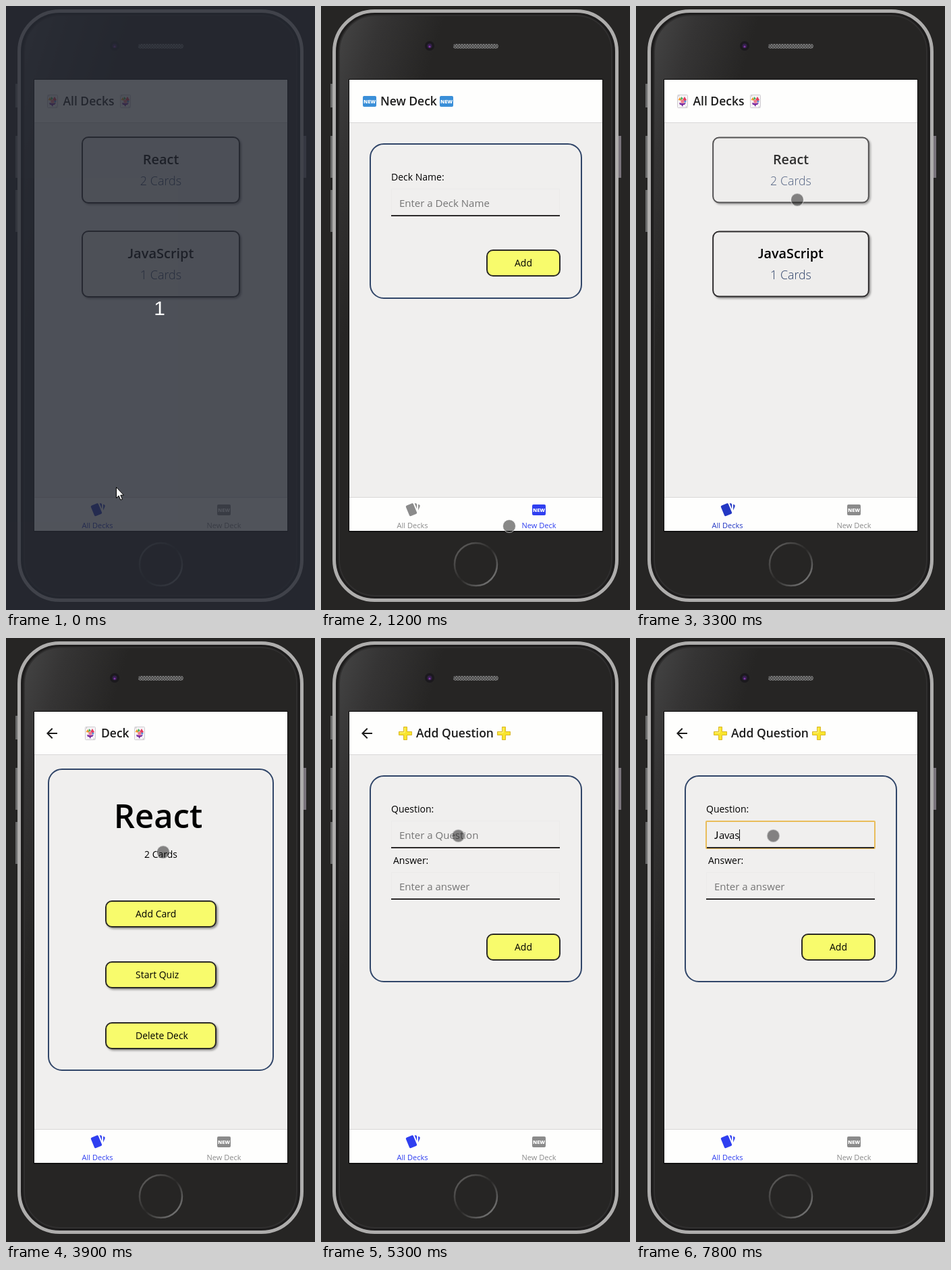
Animation of 458 by 893 pixels, one loop 8000 ms. Source, as an HTML page:

```html
<!DOCTYPE html>
<html lang="en">
<head>
<meta charset="utf-8">
<title>Flashcards</title>
<style>
  html, body { margin: 0; width: 100%; height: 100%; overflow: hidden; background: #262524; }
  svg { display: block; width: 458px; height: 893px; }
  text { font-family: "Open Sans", "Noto Sans", sans-serif; font-size: 14px; fill: #000; white-space: pre; }
  .j { font-family: Lato, sans-serif; }
  .mid { text-anchor: middle; }
  .title { font-size: 17.5px; font-weight: 600; fill: #1c1c1c; }
  .name { font-size: 20px; font-weight: 600; }
  .count { font-size: 18px; font-weight: 300; fill: #2d4168; }
  .hint { font-size: 15px; fill: #757575; }
  .typed { font-size: 15px; }
  .tab { font-size: 11px; text-anchor: middle; fill: inherit; }
  .card { fill: #eeedec; stroke: #2e2c2d; stroke-width: 2; }
  .btn { fill: #f8fb6c; stroke: #2b2a26; stroke-width: 2; }
  .frame { fill: none; stroke: #314669; stroke-width: 2; }
  .drop { filter: drop-shadow(2px 2px 1.5px rgba(0, 0, 0, .4)); }

  /* One loop is 8 s, so 1.25% is a tenth of a second. */
  .anim { animation: 8s step-end infinite; }
  #list { animation-name: list; }
  #create { animation-name: create; }
  #deck { animation-name: deck; }
  #add { animation-name: add; }
  #dim { animation-name: dim; }
  #pointer { animation-name: pointer; }
  #allTab { animation-name: all-tab; }
  #newTab { animation-name: new-tab; }
  .shrink { animation-name: shrink; transform-box: fill-box; transform-origin: center; }
  #press { animation-name: press; }
  #addCard { animation-name: add-card; }
  #focus { animation-name: focus; }
  #hint { animation-name: hint; }
  #caret { animation-name: caret; }
  #k1 { animation-name: k1; }
  #k2 { animation-name: k2; }
  #k3 { animation-name: k3; }
  #k4 { animation-name: k4; }

  @keyframes list { 0%, 27.5% { opacity: 1 } 15%, 42.5%, 100% { opacity: 0 } }
  @keyframes create { 0%, 27.5%, 100% { opacity: 0 } 15% { opacity: 1 } }
  @keyframes deck { 0%, 58.75%, 100% { opacity: 0 } 42.5% { opacity: 1 } }
  @keyframes add { 0% { opacity: 0 } 58.75%, 100% { opacity: 1 } }
  @keyframes dim { 0% { opacity: 1 } 5%, 100% { opacity: 0 } }
  @keyframes all-tab { 0%, 27.5% { fill: #2438c4 } 15% { fill: #8b8b8b } 42.5%, 100% { fill: #2f3ff0 } }
  @keyframes new-tab { 0%, 27.5%, 100% { fill: #8b8b8b } 15% { fill: #2f3ff0 } }
  @keyframes shrink { 0% { transform: none } 30% { transform: scale(.995) } 31.25%, 100% { transform: scale(.99) } }
  @keyframes press { 0%, 100% { opacity: 1 } 40% { opacity: .9 } 41.25% { opacity: .8 } }
  @keyframes add-card { 0%, 100% { opacity: 1 } 55% { opacity: .6 } 56.25% { opacity: .24 } }
  @keyframes focus { 0% { opacity: 0 } 75% { opacity: .5 } 76.25%, 100% { opacity: 1 } }
  @keyframes hint { 0% { opacity: 1 } 82.5%, 100% { opacity: 0 } }
  @keyframes k1 { 0% { opacity: 0 } 82.5%, 100% { opacity: 1 } }
  @keyframes k2 { 0% { opacity: 0 } 87.5%, 100% { opacity: 1 } }
  @keyframes k3 { 0% { opacity: 0 } 95%, 100% { opacity: 1 } }
  @keyframes k4 { 0% { opacity: 0 } 97.5%, 100% { opacity: 1 } }
  @keyframes caret {
    0% { opacity: 0; transform: none }
    75% { opacity: 1; transform: none }
    82.5% { opacity: 1; transform: translateX(7px) }
    87.5% { opacity: 1; transform: translateX(15px) }
    95% { opacity: 1; transform: translateX(23px) }
    97.5%, 100% { opacity: 1; transform: translateX(37px) }
  }
  @keyframes pointer {
    0% { opacity: 0; transform: translate(165px, 713px) }
    5% { opacity: 1; transform: translate(165px, 713px); animation-timing-function: steps(2) }
    7.5% { opacity: 1; transform: translate(264px, 760px) }
    11.25% { opacity: 1; transform: translate(279px, 769px) }
    17.5% { opacity: 1; transform: translate(279px, 769px); animation-timing-function: steps(2) }
    20% { opacity: 1; transform: translate(164px, 778px) }
    22.5% { opacity: 1; transform: translate(134px, 774px) }
    27.5% { opacity: 1; transform: translate(135.5px, 758.5px) }
    28.75% { opacity: 1; transform: translate(135.5px, 758.5px); animation-timing-function: steps(6) }
    36.25% { opacity: 1; transform: translate(239px, 286.5px) }
    47.5% { opacity: 1; transform: translate(239px, 286.5px); animation-timing-function: steps(4) }
    52.5% { opacity: 1; transform: translate(215px, 406.5px) }
    60% { opacity: 1; transform: translate(215px, 406.5px); animation-timing-function: steps(2) }
    62.5% { opacity: 1; transform: translate(206px, 294px) }
    66.25%, 100% { opacity: 1; transform: translate(203.5px, 292.5px) }
  }
</style>
</head>
<body>
<svg viewBox="0 0 458 893">
  <defs>
    <linearGradient id="sheen" x2=".45" y2=".3">
      <stop stop-color="#454545"/><stop offset=".25" stop-color="#353434"/><stop offset=".6" stop-color="#262524"/>
    </linearGradient>
    <linearGradient id="ring" x2="1" y2="1">
      <stop offset=".1" stop-color="#5c5b5a"/><stop offset=".5" stop-color="#2a2928"/><stop offset=".9" stop-color="#777"/>
    </linearGradient>
    <pattern id="mesh" width="4" height="4" patternUnits="userSpaceOnUse">
      <path fill="#484848" d="M0 0h4v4h-4z"/><path fill="#777" d="M0 0h2v2h-2zM2 2h2v2h-2z"/>
    </pattern>
    <g id="joker">
      <rect x=".5" y=".5" width="15" height="19" rx="1" fill="#f6f4f6" stroke="#cfcbd0"/>
      <path fill="#f39a2b" d="M7 9 1.500 8 4 4z"/>
      <path fill="#3fae5a" d="M5 8 6 3 9 6z"/>
      <path fill="#e53a5c" d="M8 8 11 3 14 8 11 10z"/>
      <path fill="#3d86d8" d="M10 8 14 10 11 12z"/>
      <circle cx="8" cy="10" r="2.700" fill="#ef7c8e"/>
      <path fill="#7a2ba0" d="M3 12 8 13 13 12 11 15 9 15 8 18 6 15 4 15z"/>
      <path stroke="#888" d="M2 2h1M13 18h1"/>
    </g>
    <g id="plus">
      <path d="M7.500 .5h5v7h7v5h-7v7h-5v-7h-7v-5h7z" fill="#f9e52d" stroke="#d9b72a" stroke-linejoin="round"/>
      <path d="M9 2v7H2" fill="none" stroke="#fff58c"/>
    </g>
    <g id="badge">
      <rect width="20" height="16" rx="2"/>
      <text x="10" y="11" class="mid" style="font-size:7.5px;font-weight:800;fill:#fff">NEW</text>
    </g>
    <path id="back" fill="#1c1c1c" d="M20 11H7.830l5.590-5.590L12 4l-8 8 8 8 1.410-1.410L7.830 13H20z"/>
    <g id="input">
      <path d="M.5 40V.5h249V40" fill="none" stroke="#ebeaea"/>
      <path d="M0 40h250" stroke="#2c2a2a" stroke-width="2"/>
    </g>
  </defs>

  <!-- phone -->
  <rect width="458" height="893" fill="#262524"/>
  <g fill="#6d6d6d">
    <path d="M14 115h4v35h-4zM14 192h4v62h-4zM14 272h4v62h-4z"/>
    <path fill="#79737b" d="M441 192h4v62h-4z"/>
  </g>
  <rect x="19.500" y="7.500" width="419" height="871" rx="60" fill="#1e1d1d" stroke="#aeadac" stroke-width="5"/>
  <rect x="27" y="14" width="404" height="858" rx="53" fill="url(#sheen)" stroke="#302f2f" stroke-width="2"/>
  <circle cx="161" cy="59" r="7" fill="#1b191d"/>
  <circle cx="161" cy="59" r="3.500" fill="#33204a"/>
  <circle cx="161" cy="60" r="1.500" fill="#8436a6"/>
  <rect x="196" y="56" width="67" height="7" rx="3.500" fill="url(#mesh)"/>
  <circle cx="229.500" cy="825.500" r="31.500" fill="none" stroke="url(#ring)" stroke-width="2.500"/>

  <!-- app shell -->
  <path fill="#090909" d="M41 108h377v669.500h-377z"/>
  <path fill="#f0efee" d="M42 109h375v667h-375z"/>
  <path fill="#fefefd" d="M42 109h375v63h-375zM42 727h375v49h-375z"/>
  <path stroke="#d9d8d8" d="M42 172.500h375M42 726.500h375"/>
  <g id="allTab" class="anim">
    <path fill="#2f3ff0" style="fill:inherit" transform="translate(124 733)" d="M21.470 4.350 20.130 3.790V12.820L22.560 6.960C22.970 5.940 22.500 4.770 21.470 4.350M1.970 8.050 6.930 20C7.240 20.770 7.970 21.240 8.740 21.260 9 21.260 9.270 21.210 9.530 21.100L16.900 18.050C17.650 17.740 18.110 17 18.130 16.260 18.140 16 18.090 15.710 18 15.450L13 3.500C12.710 2.730 11.970 2.260 11.190 2.250 10.930 2.250 10.670 2.310 10.420 2.400L3.060 5.450C2.040 5.870 1.550 7.040 1.970 8.050M18.120 4.250A2 2 0 0 0 16.120 2.250H14.670L18.120 10.590"/>
    <text x="135.500" y="772" class="tab">All Decks</text>
  </g>
  <g id="newTab" class="anim">
    <use href="#badge" x="313" y="737"/>
    <text x="323" y="772" class="tab">New Deck</text>
  </g>

  <!-- all decks -->
  <g id="list" class="anim">
    <use href="#joker" x="61" y="131"/>
    <text x="84.500" y="147" class="title">All Decks</text>
    <use href="#joker" x="169" y="131"/>
    <g class="anim shrink"><g id="press" class="anim">
      <rect x="113" y="194" width="233" height="97" rx="9" class="card drop"/>
      <text x="229.500" y="234" class="name mid">React</text>
      <text x="229.500" y="265" class="count mid">2 Cards</text>
    </g></g>
    <g class="anim shrink">
      <rect x="113" y="333" width="233" height="97" rx="9" class="card drop"/>
      <text x="229.500" y="373" class="name mid"><tspan class="j">J</tspan>avaScript</text>
      <text x="229.500" y="404" class="count mid">1 Cards</text>
    </g>
  </g>

  <!-- new deck -->
  <g id="create" class="anim">
    <use href="#badge" x="62" y="133" fill="#3a8fd8"/>
    <text x="88" y="147" class="title">New Deck</text>
    <use href="#badge" x="176" y="133" fill="#3a8fd8"/>
    <rect x="73" y="204" width="313" height="228" rx="20" class="frame"/>
    <text x="104" y="258">Deck Name:</text>
    <use href="#input" x="104" y="270"/>
    <text x="116" y="297" class="hint">Enter a Deck Name</text>
    <rect x="246" y="361" width="108" height="38" rx="9" class="btn"/>
    <text x="300" y="385" class="mid">Add</text>
  </g>

  <!-- deck -->
  <g id="deck" class="anim">
    <use href="#back" x="56" y="129"/>
    <use href="#joker" x="117" y="131"/>
    <text x="141" y="147" class="title">Deck</text>
    <use href="#joker" x="190" y="131"/>
    <rect x="63" y="194" width="333" height="445" rx="20" class="frame"/>
    <text x="225.500" y="281" class="mid" style="font-size:49px;font-weight:600">React</text>
    <text x="229.500" y="325" class="mid">2 Cards</text>
    <g id="addCard" class="anim">
      <rect x="148" y="389" width="163" height="38" rx="9" class="btn drop"/>
      <text x="192" y="413">Add Card</text>
    </g>
    <rect x="148" y="479" width="163" height="38" rx="9" class="btn drop"/>
    <text x="192" y="503">Start Quiz</text>
    <rect x="148" y="569" width="163" height="38" rx="9" class="btn drop"/>
    <text x="192" y="593">Delete Deck</text>
  </g>

  <!-- add question -->
  <g id="add" class="anim">
    <use href="#back" x="56" y="129"/>
    <use href="#plus" x="115" y="131"/>
    <text x="141" y="147" class="title">Add Question</text>
    <use href="#plus" x="261" y="131"/>
    <rect x="73" y="204" width="313" height="304" rx="20" class="frame"/>
    <text x="104" y="258">Question:</text>
    <use href="#input" x="104" y="270"/>
    <rect id="focus" class="anim" x="104" y="271" width="250" height="40" rx="1" fill="none" stroke="#e9bd5b" stroke-width="2"/>
    <path d="M105 310h248" stroke="#2c2a2a" stroke-width="2"/>
    <text id="hint" class="hint anim" x="116" y="297">Enter a Question</text>
    <g class="typed">
      <text id="k1" class="typed j anim" x="116" y="297">J</text>
      <text id="k2" class="typed anim" x="123" y="297">a</text>
      <text id="k3" class="typed anim" x="131" y="297">v</text>
      <text id="k4" class="typed anim" x="138" y="297">as</text>
    </g>
    <path id="caret" class="anim" d="M116.500 283v17" stroke="#111"/>
    <text x="107" y="334">Answer:</text>
    <use href="#input" x="104" y="346"/>
    <text x="116" y="373" class="hint">Enter a answer</text>
    <rect x="246" y="438" width="108" height="38" rx="9" class="btn"/>
    <text x="300" y="462" class="mid">Add</text>
  </g>

  <!-- pointer and countdown -->
  <circle id="pointer" class="anim" r="9.500" fill="rgba(20,20,20,.5)" stroke="rgba(255,255,255,.7)"/>
  <g id="dim" class="anim">
    <rect width="458" height="893" fill="#252932" fill-opacity=".8"/>
    <text x="227.500" y="457" class="mid" style="font:30px 'Liberation Sans',sans-serif;fill:#fff">1</text>
    <path d="M163.500 711.500v16l3.700-3.400 2.600 6.200 2.600-1.100-2.600-6h4.700z" fill="#fff" stroke="#000"/>
  </g>
</svg>
</body>
</html>
```
